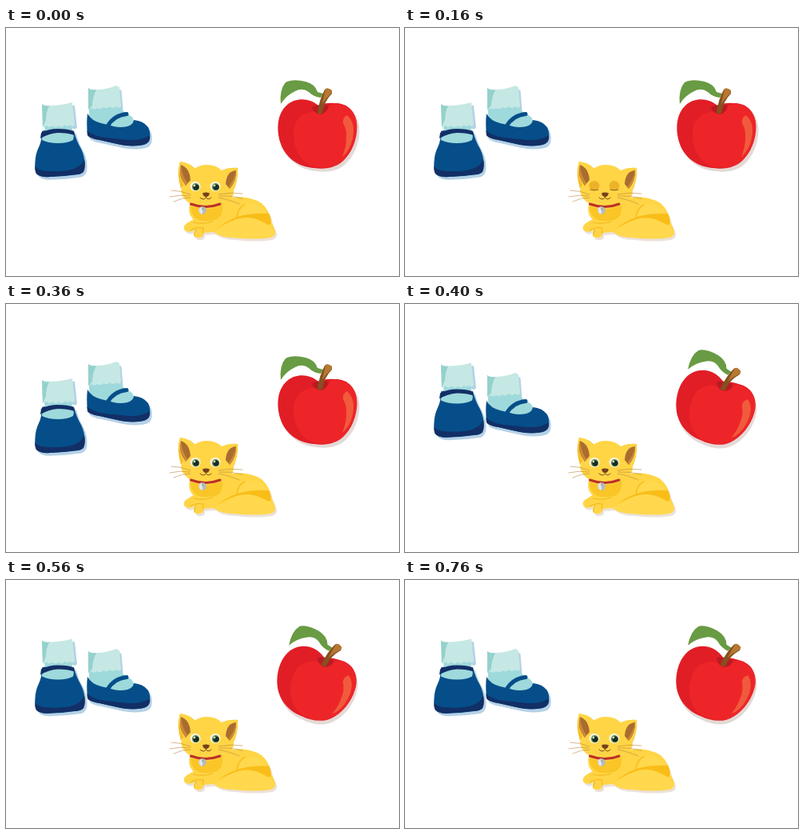
Animation, 492 px wide and 310 px high, one loop 800 ms. Source, as an HTML page:

```html
<!DOCTYPE html>
<html lang="en">
<head>
<meta charset="utf-8">
<title>Shoes, apple and cat</title>
<style>
html, body { margin: 0; width: 100%; height: 100%; overflow: hidden; background: #fff; }
svg { display: block; width: 492px; height: 310px; }
.line { fill: none; stroke-linecap: round; stroke-linejoin: round; }
</style>
</head>
<body>
<svg viewBox="0 0 492 310">
  <defs>
    <path id="frontSock" d="M45 95Q48 98 54 97Q69 97 83 93L86 121Q83 125 80 121Q77 125 74 121Q70 126 66 122Q62 126 58 122Q54 126 51 122L46 124Z"/>
    <path id="frontShoe" d="M45 129Q53 126 65 126Q77 126 85 129Q88 141 94 151Q99 161 98.500 172Q98 181 91 183Q74 185.500 56 186Q42 187 38 182Q35.500 177 36.500 167Q37 157 41 149Q45 141 45 129Z"/>
    <path id="sideSock" d="M103 75Q106 78 113 77Q126 77 138 72L142 74L144 98Q141 101 138 98Q134 102 130 98Q126 102 122 99Q118 103 114 100Q110 103 107 100L103 102Z"/>
    <path id="sideShoe" d="M102 107Q107 116 119 119Q128 121 135 123Q143 125 152 123Q159 121 160 115Q172 116 178 124Q181 130 180 138Q179 145 170 146.500Q156 148.500 144 146Q130 143 117 140Q105 138 102 134Q100.500 118 102 107Z"/>
    <path id="appleBody" d="M391 97C381 88 364 86 352 96C339 107 338 128 344 145C350 162 366 174 386 175C399 177 415 175 425 163C436 151 441 132 439 118C437 102 425 93 411 94C402 93 396 95 391 97Z"/>
    <path id="catBody" d="M231 217Q226 232 235 239L225 245Q221 249 224 253Q229 257 236 252L235 259Q237 263 243 262Q248 261 247 256L261 255Q268 262 286 262Q310 265 331 262Q338 260 337 254Q335 248 332 242Q330 228 320 219Q303 209 283 212L270 216Z"/>
  </defs>

  <g id="front">
    <g fill="#b5d1e6" transform="translate(3 3.500)"><use href="#frontSock"/><use href="#frontShoe"/></g>
    <use href="#frontShoe" fill="#064e89"/>
    <path fill="#9ed9dc" d="M47 117H84L83 129Q86 135 84 140Q77 144 65 144Q53 144 45 140Q45 134 49 129Z"/>
    <path fill="#122f66" d="M44 131Q53 126 65 126Q78 126 85 129L86 134Q77 131 65 131Q53 132 43 138Z"/>
    <path fill="#122f66" d="M36.500 173Q40 179 56 179Q80 180 89 174Q95 171 98 164Q100 174 97 180Q94 183 88 183Q72 185 56 186Q42 187 38 182Q36 179 36.500 173Z"/>
    <use href="#frontSock" fill="#c5e8e4"/>
    <path fill="#94d1cd" d="M45 95Q48 98 54 97Q50 106 50 115L46 124Z"/>
  </g>

  <g id="side">
    <g fill="#b5d1e6" transform="translate(2.500 4)"><use href="#sideSock"/><use href="#sideShoe"/></g>
    <path fill="#9ed9dc" d="M104 98H143L149 107Q159 109 160 116Q157 125 145 125L117 121L104 111Z"/>
    <use href="#sideShoe" fill="#064e89"/>
    <path class="line" stroke="#064e89" stroke-width="5" stroke-linecap="butt" d="M127 123Q135 109 151 107.500"/>
    <path fill="#122f66" d="M101.500 128Q109 135 124 137Q138 138 149 139.500Q168 142 180 134Q182 143 172 146Q158 148.500 144 146Q130 143 117 140Q105 138 102 134Z"/>
    <use href="#sideSock" fill="#c5e8e4"/>
    <path fill="#94d1cd" d="M103 75Q106 78 113 77Q108 88 108 97L103 102Z"/>
  </g>

  <g id="apple">
    <use href="#appleBody" fill="#e4d9d6" transform="translate(3 4)"/>
    <use href="#appleBody" fill="#e11e26"/>
    <path fill="#ee2528" d="M391 105C379 103 365 109 361 123C357 143 365 164 382 172C398 177 415 174 424 163C435 151 440 133 439 118C436 102 425 95 411 95C404 95 402 103 391 105Z"/>
    <path fill="#b91b22" d="M383 99Q392 94 404 97Q403 106 394 108Q385 107 383 99Z"/>
    <path fill="#f15a3d" d="M427 109Q438 119 434 138Q431 153 421 161Q426 149 426 138Q427 127 422 119Q421 112 427 109Z"/>
    <path fill="#689b43" d="M344 95Q342 77 350 68Q359 63 375 67Q387 70 390 80L397 82L394 87Q385 86 379 80Q371 74 362 79Q351 84 344 95Z"/>
    <path fill="#87511f" d="M390 106Q392 90 399 77Q402 74 408 78L408 82Q398 92 396 106Q393 109 390 106Z"/>
    <path fill="#b57932" d="M400 76Q403 74 408 78L407 82Q400 88 396 95Q398 85 400 76Z"/>
  </g>

  <g id="cat">
    <use href="#catBody" fill="#ebe1db" transform="translate(2 3)"/>
    <use href="#catBody" fill="#ffd545"/>
    <path fill="#fac526" d="M231 222Q250 231 271 221Q272 233 266 238Q257 243 243 241Q231 236 231 222Z"/>
    <path fill="#ffd545" d="M235 239Q252 243 264 240Q255 247 239 250Q232 257 224 253Q221 249 227 244Z"/>
    <path class="line" stroke="#f0b51c" d="M235 243Q247 246 258 242M231 253Q239 248 246 250M238 252Q235 256 236 260M247 250Q246 254 247 257"/>
    <g id="haunch">
      <path fill="#f9bd18" d="M262 254Q274 242 290 237Q314 230 329 233Q333 240 331 246Q325 248 317 242Q303 237 287 242Q273 247 262 254Z"/>
      <path fill="#ffd84d" d="M260 255Q271 246 288 240Q304 235 319 242Q332 247 336 255Q337 260 331 262Q309 264 283 262Q266 261 260 255Z"/>
      <path fill="#ffd84d" d="M291 236Q293 227 302 221Q317 219 327 233Q309 232 291 236Z"/>
      <path class="line" stroke="#f7bd20" stroke-width="1.500" d="M289 238Q290 226 299 222"/>
    </g>

    <path fill="#f5bd26" d="M219 201Q213 181 218 167Q231 169 238 177ZM269 179Q279 174 290 175Q291 191 284 205Z"/>
    <path fill="#ffd545" d="M222 196Q214 179 218 167Q230 168 236 176Q242 171 252 171Q263 171 270 178Q280 174 289.500 175Q290 191 285 202Q286 215 271 221Q250 227 231 220Q220 213 219 203Z"/>
    <path fill="#aa6c2f" d="M219 171Q230 175 231 190L225 197Q215 185 219 171ZM288 178Q276 179 275 195L280 201Q289 191 288 178Z"/>
    <path fill="#cd8b37" d="M219 171Q216 185 225 197L227 194Q220 184 219 171ZM288 178Q288 192 280 201L279 198Q286 189 288 178Z"/>
    <g id="open"></g>
    <g id="closed">
      <ellipse cx="237" cy="197" rx="6.500" ry="6" fill="#edb22b"/>
      <ellipse cx="262" cy="197" rx="6.500" ry="6" fill="#edb22b"/>
      <path class="line" stroke="#8c5c22" d="M232 202Q237 204 242 202M257 202Q262 204 267 202"/>
    </g>
    <path fill="#77401f" d="M246 206.500Q250 204.500 255 206.500Q254 211 250.500 211Q247 211 246 206.500Z"/>
    <path class="line" stroke="#76491d" d="M250.500 211V212Q247 216 243 212M250.500 212Q253 216 257 212"/>
    <path class="line" stroke="#b9863e" stroke-width=".6" d="M231 208Q218 203 207 203M230 210Q217 208 205 211M231 212Q220 212 210 217M266 208Q281 205 296 207M267 210Q281 209 296 213M266 212Q281 215 292 220"/>
    <path class="line" stroke="#bd3027" stroke-width="3" d="M231.500 220Q250 227 268 220"/>
    <circle cx="246" cy="228" r="4.800" fill="#b6bbc0"/>
    <path fill="#e3e6e8" d="M246 223.500A4.500 4.500 0 0 0 246 232.500Z"/>
    <path class="line" stroke="#858b92" d="M246 224V227"/>
  </g>
</svg>
<script>
const LOOP = 800, STEP = 40;
const el = id => document.getElementById(id);
const [front, side, apple, haunch, open, closed] =
  ['front', 'side', 'apple', 'haunch', 'open', 'closed'].map(el);

open.innerHTML = [237, 262].map(x => `
  <ellipse cx="${x}" cy="198" rx="6.5" ry="6.2" fill="#f5f3dd"/>
  <circle cx="${x + .5}" cy="198.7" r="4.6" fill="#668c4d"/>
  <circle cx="${x + 1}" cy="199" r="3.6" fill="#172d25"/>
  <circle cx="${x - 1}" cy="197" r="1.2" fill="#fff"/>`).join('');

const place = (node, value) => node.setAttribute('transform', value);

function draw(time) {
  const t = Math.floor((time % LOOP) / STEP) * STEP;
  const second = t >= 400;
  const blink = t >= 160 && t < 320;
  place(front, `translate(0 ${second ? -19.5 : 0})`);
  place(side, `translate(0 ${second ? 14 : 0})`);
  place(apple, second ? 'translate(-3 -1.5) rotate(17 390 133)' : '');
  open.style.display = blink ? 'none' : '';
  closed.style.display = blink ? '' : 'none';

  // Gentle breathing, anchored at the floor.
  const breath = 1 + .02 * (1 + Math.cos(2 * Math.PI * t / LOOP));
  place(haunch, `translate(0 262) scale(1 ${breath}) translate(0 -262)`);
}

const start = performance.now();
function tick() {
  draw(performance.now() - start);
  requestAnimationFrame(tick);
}
tick();
</script>
</body>
</html>
```
